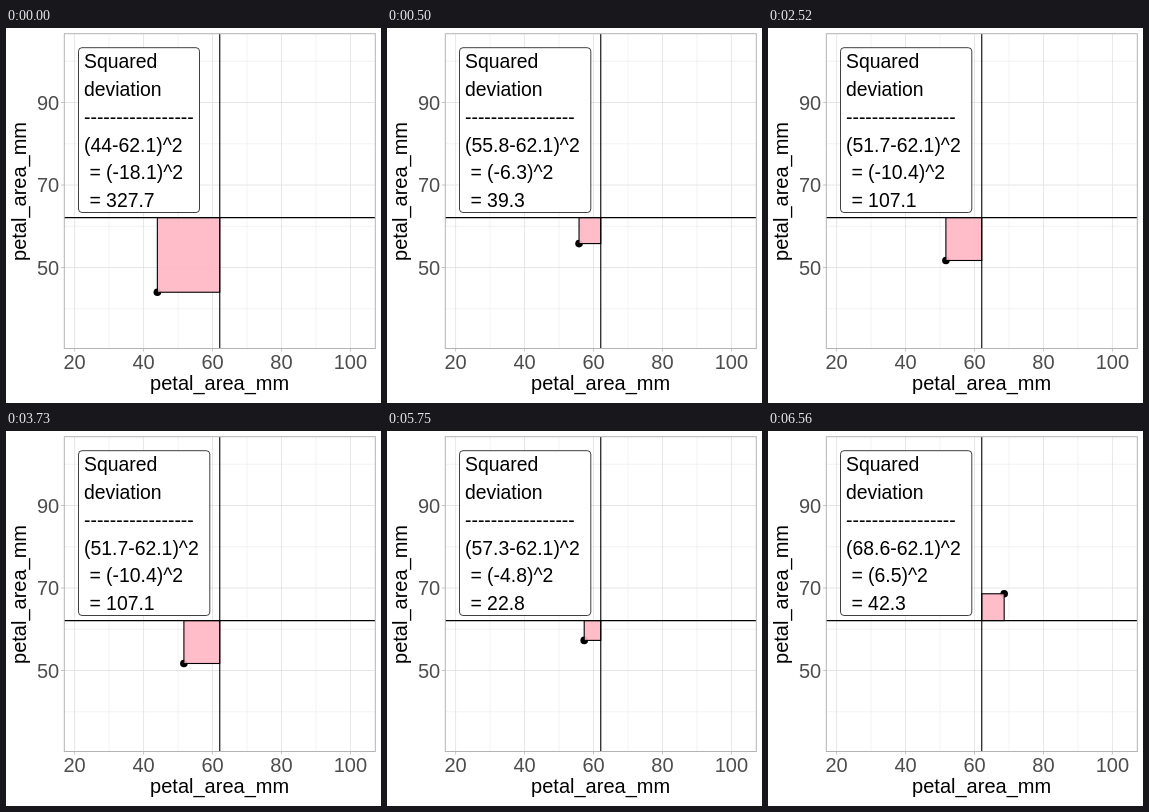
These frames come from a looping animation (375 px wide and 375 px high, 8 s). An HTML page:

```html
<!DOCTYPE html>
<html lang="en">
<head>
<meta charset="utf-8">
<title>Squared deviation</title>
<style>
  html, body { margin: 0; width: 100%; height: 100%; overflow: hidden; background: #fff; }
  svg { display: block; width: 100vw; height: 100vh; }
  text { font-family: "Liberation Sans", Arial, sans-serif; font-size: 20px; white-space: pre; }
  .tick { fill: #4d4d4d; }
  #label text { font-size: 19.4px; }
</style>
</head>
<body>
<svg id="plot" viewBox="0 0 375 375"></svg>
<script>
const MEAN = 62.1, LOOP = 8000;
const steps = [
  { at: 0, value: 44, square: "327.7" },
  { at: 500, value: 55.8, square: "39.3" },
  { at: 2520, value: 51.7, square: "107.1" },
  { at: 4540, value: 57.3, square: "22.8" },
  { at: 6560, value: 68.6, square: "42.3" }
];
const plot = document.getElementById("plot");
const px = v => 68.6 + (v - 20) * 3.448;
const py = v => 239.5 - (v - 50) * 4.125;

function add(parent, tag, attrs, content = "") {
  const el = document.createElementNS("http://www.w3.org/2000/svg", tag);
  for (const key in attrs) el.setAttribute(key, attrs[key]);
  el.textContent = content;
  return parent.appendChild(el);
}
const line = (x1, y1, x2, y2, stroke, width) =>
  add(plot, "line", { x1, y1, x2, y2, stroke, "stroke-width": width });
const text = (x, y, content, attrs = {}) =>
  add(plot, "text", { x, y, "text-anchor": "middle", ...attrs }, content);

const gridX = (v, w) => line(px(v), 6, px(v), 320, "#dedede", w);
const gridY = (v, w) => line(58, py(v), 369, py(v), "#dedede", w);
[30, 50, 70, 90].forEach(v => gridX(v, .4));
[40, 60, 80, 100].forEach(v => gridY(v, .4));
for (const v of [20, 40, 60, 80, 100]) {
  gridX(v, .75);
  line(px(v), 320, px(v), 323.5, "#b3b3b3", .75);
  if (v !== 80) text(px(v), 341, v, { class: "tick" });
}
text(px(80), 341, 80, { class: "tick" });
for (const v of [50, 70, 90]) {
  gridY(v, .75);
  line(55, py(v), 58.5, py(v), "#b3b3b3", .75);
  text(53.2, py(v) + 7.2, v, { class: "tick", "text-anchor": "end" });
}

const dot = add(plot, "circle", { r: 3.8 });
const square = add(plot, "rect", {
  fill: "#ffb9c6", "fill-opacity": .93, stroke: "#000", "stroke-width": 1.1
});
line(px(MEAN), 6, px(MEAN), 320, "#000", 1.1);
line(58, py(MEAN), 369, py(MEAN), "#000", 1.1);
add(plot, "rect", { x: 58.3, y: 5.7, width: 311, height: 314.8, fill: "none", stroke: "#b3b3b3" });
text(213.6, 362, "petal_area_mm");
text(0, 0, "petal_area_mm", { transform: "translate(20 163.5) rotate(-90)" });

const label = add(plot, "g", { id: "label" });
const box = add(label, "rect", {
  x: 72.5, y: 19.7, height: 164.8, rx: 3.5, fill: "#fff", stroke: "#000", "stroke-width": .75
});
const rows = Array.from({ length: 6 }, (_, i) =>
  add(label, "text", { x: 78, y: 40.3 + i * 27.75 }));

function show({ value, square: result }) {
  const x = px(value), y = py(value), mx = px(MEAN), my = py(MEAN);
  dot.setAttribute("cx", x);
  dot.setAttribute("cy", y);
  square.setAttribute("x", Math.min(x, mx));
  square.setAttribute("y", Math.min(y, my));
  square.setAttribute("width", Math.abs(x - mx));
  square.setAttribute("height", Math.abs(y - my));
  box.setAttribute("width", Number.isInteger(value) ? 121 : 131.3);
  const lines = ["Squared", "deviation", "-".repeat(17), `(${value}-${MEAN})^2`,
    ` = (${(value - MEAN).toFixed(1)})^2`, ` = ${result}`];
  rows.forEach((row, i) => row.textContent = lines[i]);
}

const start = performance.now();
let current;
function frame() {
  const t = (performance.now() - start) % LOOP;
  const step = steps.findLast(s => t >= s.at);
  if (step !== current) show(current = step);
  requestAnimationFrame(frame);
}
frame();
</script>
</body>
</html>
```
